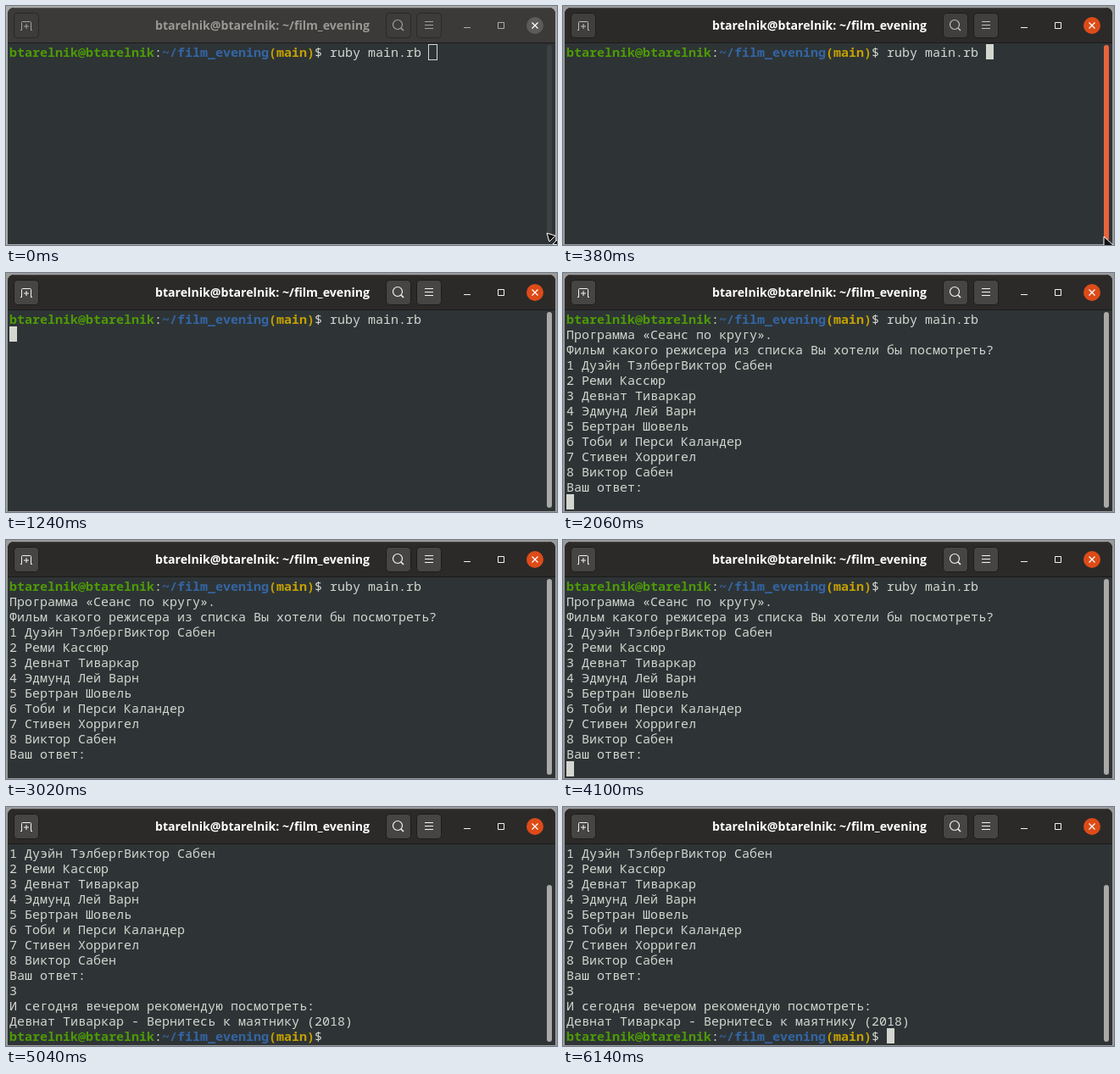
An HTML page that plays this animation: 650 by 282 pixels, repeating every 6240 ms.

```html
<!DOCTYPE html>
<html lang="ru">
<head>
<meta charset="utf-8">
<title>Terminal</title>
<style>
  html, body { margin: 0; width: 100%; height: 100%; overflow: hidden; background: #9b9b9a; }
  svg { position: absolute; left: 0; top: 0; }
  #title { font: bold 14.15px "Open Sans", "Noto Sans", sans-serif; text-anchor: middle; }
  #term {
    position: absolute; left: 4px; top: 45px; width: 632px; height: 234px; margin: 0;
    overflow: hidden; color: #d3d7cf;
    font: 15px/18px "Noto Sans Mono", "DejaVu Sans Mono", monospace;
  }
  #term b:nth-of-type(3n+1) { color: #4e9a06; }
  #term b:nth-of-type(3n+2) { color: #3465a4; }
  #term b:nth-of-type(3n) { color: #c4a000; }
  .line { fill: none; stroke: currentColor; }
</style>
</head>
<body>
<svg width="650" height="282">
  <rect id="desk" width="650" height="282"/>
  <path d="M2 281V10Q2 2 10 2H640Q648 2 648 10V281Z" fill="#2e3436"/>
  <path id="bar" d="M2 43V10Q2 2 10 2H640Q648 2 648 10V43Z"/>
  <path d="M9 2.5H641" stroke="#fff" stroke-opacity=".12"/>
  <path d="M2 43.5H648" stroke="#1b1b1a"/>
  <g id="buttons">
    <rect x="9.5" y="8.5" width="29" height="29" rx="4"/>
    <rect x="448.5" y="8.5" width="29" height="29" rx="4"/>
    <rect x="484.5" y="8.5" width="29" height="29" rx="4"/>
  </g>
  <g id="icons" class="line">
    <path d="M17 28.5H18.5V19.5Q18.5 18.5 19.5 18.5H28.5Q29.5 18.5 29.5 19.5V28.5H31M24 21V27M21 24H27"/>
    <circle cx="462" cy="22" r="5.5" stroke-width="1.2"/>
    <path d="M466 26L469 29" stroke-width="1.6"/>
    <path d="M494 18.5H504M494 22.5H504M494 26.5H504"/>
  </g>
  <g id="controls" class="line">
    <path d="M540 25.5H548M580.5 19.5H587.5V26.5H580.5Z"/>
  </g>
  <circle id="close" cx="624" cy="23" r="10"/>
  <path d="M620.5 19.5L627.5 26.5M627.5 19.5L620.5 26.5" stroke="#fff" stroke-width="1.3"/>
  <text id="title" x="302.5" y="28">btarelnik@btarelnik: ~/film_evening</text>
  <rect id="slider" x="638" width="6" rx="3"/>
</svg>
<pre id="term"></pre>
<svg width="650" height="282">
  <rect id="caret"/>
  <path id="arrow" d="M0 0V16L4 12L7 18L9 17L7 11H12Z" fill="#111" stroke="#fff"/>
  <g id="resize" fill="#111" stroke="#fff">
    <path d="M0 0L10 3L3 10Z"/>
    <path d="M14 14L7 13L13 7Z"/>
  </g>
</svg>
<script>
const LOOP = 6240, ENTER = 1240, LIST = 2060, ANSWER = 4700, RESULT = 4720, FOCUS = 340;
const ROWS = 13, LINE = 18;
const $ = id => document.getElementById(id);
const clamp = x => Math.min(1, Math.max(0, x));
const mix = (a, b, k) => `color-mix(in srgb, ${b} ${k * 100}%, ${a})`;

const prompt = "<b>btarelnik@btarelnik</b>:<b>~/film_evening</b><b>(main)</b>$ ";
const names = ["Дуэйн ТэлбергВиктор Сабен", "Реми Кассюр", "Девнат Тиваркар", "Эдмунд Лей Варн",
  "Бертран Шовель", "Тоби и Перси Каландер", "Стивен Хорригел", "Виктор Сабен"];
const menu = ["Программа «Сеанс по кругу».", "Фильм какого режисера из списка Вы хотели бы посмотреть?",
  ...names.map((n, i) => `${i + 1} ${n}`), "Ваш ответ:"];
const result = ["И сегодня вечером рекомендую посмотреть:", `${names[2]} - Вернитесь к маятнику (2018)`];

// spans in which the caret is hidden
const blinks = [[700, 1060], [1580, 1940], [2300, 2660], [3020, 3380], [3740, 4100],
  [4460, 4700], [5040, 5400], [5760, 6140]];
const sliderKeys = [[0, "#3c4143"], [120, "#3c4143"], [300, "#8a8b89"], [340, "#8a8b89"],
  [380, "#e9643c"], [460, "#e9643c"], [560, "#cfccc8"], [600, "#cfccc8"], [600, "#aaa9a7"]];

function screen(t) {
  const rows = [prompt + "ruby main.rb "];
  if (t >= LIST) rows.push(...menu);
  if (t >= ANSWER) rows.push("3");
  if (t >= RESULT) rows.push(...result, prompt);
  else if (t >= ENTER) rows.push("");
  return rows;
}

function sliderColor(t) {
  const i = sliderKeys.findLastIndex(k => k[0] <= t);
  const [a, b] = [sliderKeys[i], sliderKeys[i + 1]];
  return b ? mix(a[1], b[1], (t - a[0]) / (b[0] - a[0])) : a[1];
}

function set(id, attrs) {
  for (const k in attrs) $(id).setAttribute(k, attrs[k]);
}

function drawTerminal(t) {
  const rows = screen(t), scroll = Math.max(0, rows.length - ROWS);
  const html = rows.slice(scroll).join("\n");
  if (drawTerminal.last !== html) $("term").innerHTML = drawTerminal.last = html;

  const last = rows.at(-1).replace(/<.*?>/g, "");
  const on = !blinks.some(([a, b]) => t >= a && t < b);
  const x = 4 + last.length * 9, y = 45 + (rows.length - 1 - scroll) * LINE;
  set("caret", t < FOCUS
    ? { x: x - .5, y: y + .5, width: 10, height: LINE, fill: "none", stroke: "#d3d7cf" }
    : { x, y, width: 9, height: LINE, fill: on ? "#d3d7cf" : "none", stroke: "none" });
  const top = 46 + scroll * 15.3;
  set("slider", { y: top, height: 277 - top, fill: sliderColor(t) });
}

function drawWindow(t) {
  const focused = t >= FOCUS, fade = 1 - (1 - clamp((t - FOCUS) / 200)) ** 2;
  set("desk", { fill: focused ? "#9b9b9a" : "#aaaaa9" });
  set("bar", { fill: focused ? "#2b2a29" : "#3b3a38" });
  set("title", { fill: focused ? "#fff" : "#9a9996" });
  set("close", { fill: focused ? "#dd4b18" : "#5c5b59" });
  set("buttons", { fill: mix("#3d3c3a", "#464543", fade), stroke: focused ? "#1e1d1c" : "#2a2928" });
  set("icons", { color: mix("#a3a29f", "#f4f4f2", fade) });
  set("controls", { color: focused ? "#f4f4f2" : "#b0afac" });
}

function drawPointer(t) {
  const onBar = t >= 120 && t < 520;
  const go = clamp(t / 300), back = clamp((t - 440) / 120);
  const place = `translate(${638 - 4 * back} ${268 + 4 * go - 2 * back})`;
  set("arrow", { transform: place, visibility: t < 600 && onBar ? "visible" : "hidden" });
  set("resize", { transform: place, visibility: t < 600 && !onBar ? "visible" : "hidden" });
}

const start = performance.now();
function frame() {
  const t = (performance.now() - start) % LOOP;
  drawWindow(t);
  drawTerminal(t);
  drawPointer(t);
  requestAnimationFrame(frame);
}
frame();
</script>
</body>
</html>
```
